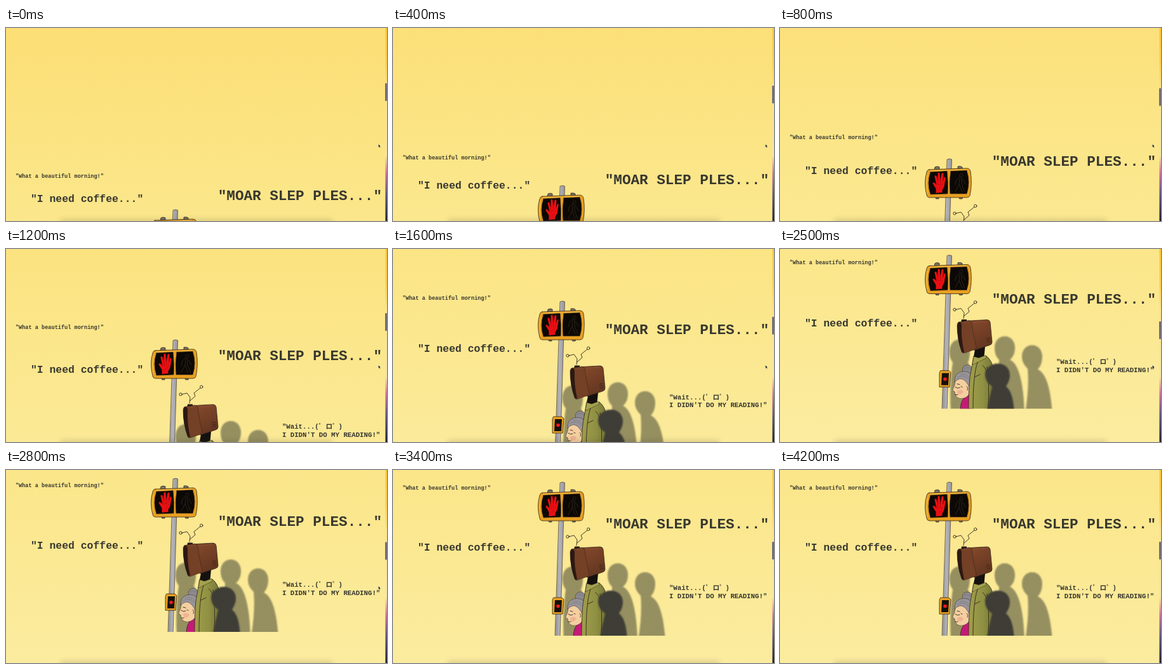
Recreate the animation shown at these times as an HTML page. Size 600 px wide and 304 px high, loop 4300 ms.

```html
<!DOCTYPE html>
<html lang="en">
<head>
<meta charset="utf-8">
<title>Morning crossing</title>
<style>
html, body { margin: 0; width: 100%; height: 100%; overflow: hidden; background: #fbe68a; }
svg { display: block; width: 600px; height: 304px; }
text { font-family: "Courier New", "Liberation Mono", "Noto Sans CJK JP", monospace; font-weight: 700; fill: #38372f; white-space: pre; }
.ink { stroke: #33261a; stroke-width: .8; stroke-linejoin: round; stroke-linecap: round; }
.line { fill: none; stroke: #33261a; stroke-width: .9; stroke-linejoin: round; stroke-linecap: round; }
</style>
</head>
<body>
<svg viewBox="0 0 600 304" xmlns="http://www.w3.org/2000/svg">
<defs>
  <linearGradient id="sky" x2="0" y2="1">
    <stop offset="0" stop-color="#fcde74"/><stop offset=".4" stop-color="#fbe586"/><stop offset="1" stop-color="#fbeca0"/>
  </linearGradient>
  <linearGradient id="desk" x2="0" y2="1">
    <stop offset="0" stop-color="#fdc52f"/><stop offset=".18" stop-color="#fbcc4c"/><stop offset=".32" stop-color="#fbe28c"/>
    <stop offset=".66" stop-color="#f6e3a4"/><stop offset=".75" stop-color="#c9719c"/><stop offset=".86" stop-color="#5c5280"/><stop offset="1" stop-color="#1b1c30"/>
  </linearGradient>
  <linearGradient id="metal"><stop offset="0" stop-color="#8c8c92"/><stop offset=".45" stop-color="#b4b4b9"/><stop offset="1" stop-color="#97979c"/></linearGradient>
  <linearGradient id="wood" x2=".4" y2="1"><stop offset="0" stop-color="#85492c"/><stop offset="1" stop-color="#643620"/></linearGradient>
  <linearGradient id="coat"><stop offset="0" stop-color="#a09e4c"/><stop offset=".55" stop-color="#8f9043"/><stop offset="1" stop-color="#737634"/></linearGradient>
  <pattern id="hatch" width="4" height="4" patternUnits="userSpaceOnUse" patternTransform="rotate(20)">
    <rect width="4" height="4" fill="#918b5e"/><path d="M1 0V4" stroke="#a8a06a" stroke-width=".8"/>
  </pattern>
  <pattern id="dark" width="4" height="4" patternUnits="userSpaceOnUse" patternTransform="rotate(20)">
    <rect width="4" height="4" fill="#3b3a34"/><path d="M1 0V4" stroke="#4d4b3f" stroke-width=".8"/>
  </pattern>
  <filter id="soft" x="-10%" y="-10%" width="120%" height="120%"><feGaussianBlur stdDeviation="1.3"/></filter>
  <filter id="blur" x="-10%" y="-200%" width="120%" height="500%"><feGaussianBlur stdDeviation="4"/></filter>
  <clipPath id="ground"><rect x="200" y="0" width="260" height="261"/></clipPath>
</defs>

<g id="page">
  <rect y="-280" width="600" height="600" fill="url(#sky)"/>
  <g clip-path="url(#ground)">
    <g fill="url(#hatch)" filter="url(#soft)">
      <path d="M283 152C293 152 299 160 299 171C299 178 298 184 296 188L301 200V268H269C267 240 269 210 272 188C268 183 267 178 267 171C267 160 273 152 283 152Z"/>
      <path d="M354 147C364 147 370 155 370 165C370 174 367 180 362 184C377 190 384 225 385 268H339L345 184C340 179 338 173 338 165C338 155 344 147 354 147Z"/>
      <path d="M397 161C407 161 413 169 413 179C413 188 410 195 406 199C420 206 426 230 429 268H386C390 245 392 220 390 198C385 193 381 187 381 179C381 169 387 161 397 161Z"/>
    </g>

    <path class="ink" stroke-opacity=".75" fill="url(#metal)" d="M263.300 20Q267 18 270.500 20L263 264H255.300Z"/>

    <g id="signal">
      <path class="ink" fill="#77726a" d="M243 37L244 32Q248 30 251 32V37ZM280 35L280 31Q284 30 287 32V36ZM245 79H250V82H246ZM282 79H288L287 82H283Z"/>
      <path class="ink" fill="#e8a021" d="M235 36L294 34Q299 34 300 39Q303 59 299 77Q298 80 294 80L235 80Q231 79 231 76Q226 57 231 40Q232 36 235 36Z"/>
      <path fill="none" stroke="#f7c54f" d="M232 44Q229 59 232 73M236 38L293 36"/>
      <path class="ink" fill="#0c0805" d="M237 40L263 38.500Q265 56 264 74L237 75Q231 57 237 40ZM269 38.500L294 37.500Q300 56 294 74L268 74Q266 56 269 38.500Z"/>
      <g transform="translate(-.5 -1)">
        <path fill="#ea0f12" d="M246 74L246 67L241 59Q241 56 244 58L247 61L244 48Q244 45 247 47L249 55L249 43Q251 40 252 43L253 54L255 43Q257 41 258 44L257 56L259 49Q262 48 261 52L259 64L256 69L256 73Z"/>
        <path fill="none" stroke="#8a0c0d" stroke-width=".5" d="M248 62Q252 58 257 61M250 68L255 63M249 55V59M253 54V58"/>
      </g>
      <path fill="none" stroke="#2a251a" d="M283 45A2.500 2.500 0 1 1 283 45.100M283 47L278 52L276 60M284 48L289 53L292 59M283 49L282 59L276 71M286 51L286 59L291 71M282 59L287 71"/>
    </g>

    <g id="button">
      <path class="ink" fill="#e8a021" d="M253 201H266L269 204L267 227H251L251 205Z"/>
      <path fill="#14100c" d="M255 205H266L265 224H254Z"/>
      <circle cx="260" cy="214.500" r="2.800" fill="#ea1c1c"/>
    </g>

    <g id="lady">
      <path class="ink" fill="#c71a78" d="M284 264Q284 250 290 244L302 236V264Z"/>
      <path class="ink" stroke-opacity=".6" fill="#f4cfa0" d="M277 212L275 224L272 231Q272 234 275 234L276 239Q279 246 287 245Q295 244 299 236L300 215Z"/>
      <path fill="#eda58a" opacity=".65" d="M279 233Q285 229 289 234Q286 240 280 238Z"/>
      <path class="line" stroke-width=".7" d="M276 227Q279 230 283 228M276 239L280 239M279 222L283 223M285 226L287 227M294 226Q297 228 295 232"/>
      <circle class="ink" stroke-opacity=".6" cx="295" cy="200" r="8" fill="#8c8a8d"/>
      <path class="ink" stroke-opacity=".6" fill="#98959a" d="M275 219Q274 207 284 203Q297 200 304 210L304 231Q299 231 296 223Q290 213 283 214Q279 215 275 219Z"/>
      <path fill="none" stroke="#737077" stroke-width=".6" d="M279 212Q289 205 299 216M283 207Q296 204 302 218M290 198Q295 194 301 199"/>
    </g>

    <g id="man">
      <path fill="#15110f" d="M308 163H323L321 184H304Z"/>
      <path class="ink" fill="url(#coat)" d="M305 179L311 183L325 178Q334 185 336 199L338 264H297Q297 216 301 201Z"/>
      <path class="ink" stroke-opacity=".6" fill="#a3a24e" d="M305 179L303 192L311 188L325 181L324 177L313 181Z"/>
      <path class="line" stroke="#555a28" stroke-width=".7" d="M311 188Q304 208 304 261M326 195Q330 220 328 261M307 211L315 207M319 193Q325 197 326 207"/>
      <path class="line" d="M289 119L290 110L285 103L277 105M290 115L298 108L296 103L306 95"/>
      <circle class="line" cx="275" cy="105" r="2.200"/><circle class="line" cx="307.700" cy="93.300" r="2.200"/>
      <path fill="#211510" d="M286 120.500H294V126H285Z"/>
      <path class="ink" fill="url(#wood)" d="M299 122.500L326 121Q330 121 331 125L334 156Q334 160 330 161L306 169Z"/>
      <path class="ink" stroke-opacity=".7" fill="#744026" d="M282 124.500L297 122Q301 122 302 126Q304 144 309 164Q309 167 306 168L290 173.500Q287 174 286 171Q279 152 279 130Q279 125 282 124.500Z"/>
      <path fill="#2c1912" d="M281 125Q286 124 286 130Q285 150 290 172Q287 174 286 171Q279 152 279 130Z"/>
      <path fill="none" stroke="#96593a" stroke-width=".8" opacity=".6" d="M289 126L299 124.500M305 125L326 123.500"/>
      <path class="line" stroke-width=".7" d="M325 150L330 149M325 153L331 152M326 156L331 155"/>
    </g>

    <path fill="url(#dark)" filter="url(#soft)" d="M343 190C355 190 362 198 362 208C362 217 358 222 356 226C365 233 368 249 369 268H325C328 253 331 239 334 226C327 221 323 215 323 207C323 198 332 190 343 190Z"/>
  </g>
</g>

<g id="morning"><text x="14.900" y="31.200" font-size="8.580">"What a beautiful morning!"</text></g>
<g id="coffee"><text x="38.900" y="126.800" font-size="16.430">"I need coffee..."</text></g>
<g id="sleep"><text x="333.700" y="92.200" font-size="22.660">"MOAR SLEP PLES..."</text></g>
<g id="reading" font-size="10.720">
  <text x="434.900" y="188.700">"Wait...(ﾟ<tspan x="503.500">ロﾟ</tspan><tspan x="523.600">)</tspan></text>
  <text x="434.900" y="201.600">I DIDN'T DO MY READING!"</text>
</g>

<rect x="86" y="301" width="428" height="12" fill="#3a3320" opacity=".16" filter="url(#blur)"/>
<rect x="597.500" width="2.500" height="304" fill="url(#desk)"/>
<rect id="thumb" x="597" width="3" height="28" rx="1" fill="#716c77"/>
<path id="cursor" d="M586.500 183L586.500 188L587.700 187L588.600 189L589.400 188.600L588.500 186.700L590 186.500Z" fill="#111" stroke="#fff" stroke-width=".3"/>
</svg>
<script>
const LOOP = 4300, STEP = 100;
// time in ms, distance from the resting scroll position
const keys = [[0, 267], [800, 187], [1600, 63], [2100, 20], [2500, -9.5], [2600, -10], [3000, -1], [3200, 0], [LOOP, 0]];
const speeds = { page: 1, morning: .768, coffee: .552, sleep: .67, reading: .76 };
const el = id => document.getElementById(id);

const slope = i => (keys[i + 1][1] - keys[i][1]) / (keys[i + 1][0] - keys[i][0]);
function tangent(i) {
  if (i === 0) return slope(0);
  if (i === keys.length - 1) return 0;
  const a = slope(i - 1), b = slope(i);
  return a * b > 0 ? 2 * a * b / (a + b) : 0;
}

function offset(t) {
  let i = 0;
  while (i < keys.length - 2 && t >= keys[i + 1][0]) i++;
  const [t0, y0] = keys[i], [t1, y1] = keys[i + 1];
  const d = t1 - t0, u = (t - t0) / d, v = 1 - u;
  return y0 * (1 + 2 * u) * v * v + tangent(i) * d * u * v * v
    + y1 * u * u * (3 - 2 * u) - tangent(i + 1) * d * u * u * v;
}

function draw(ms) {
  const t = Math.floor(ms % LOOP / STEP) * STEP;
  const y = offset(t);
  for (const id in speeds) el(id).setAttribute("transform", `translate(0 ${(y * speeds[id]).toFixed(2)})`);
  el("thumb").setAttribute("y", 113 - y * 26 / 267);
  el("cursor").setAttribute("visibility", t < 2900 ? "visible" : "hidden");
}

const start = performance.now();
function tick() {
  draw(performance.now() - start);
  requestAnimationFrame(tick);
}
draw(0);
requestAnimationFrame(tick);
</script>
</body>
</html>
```
